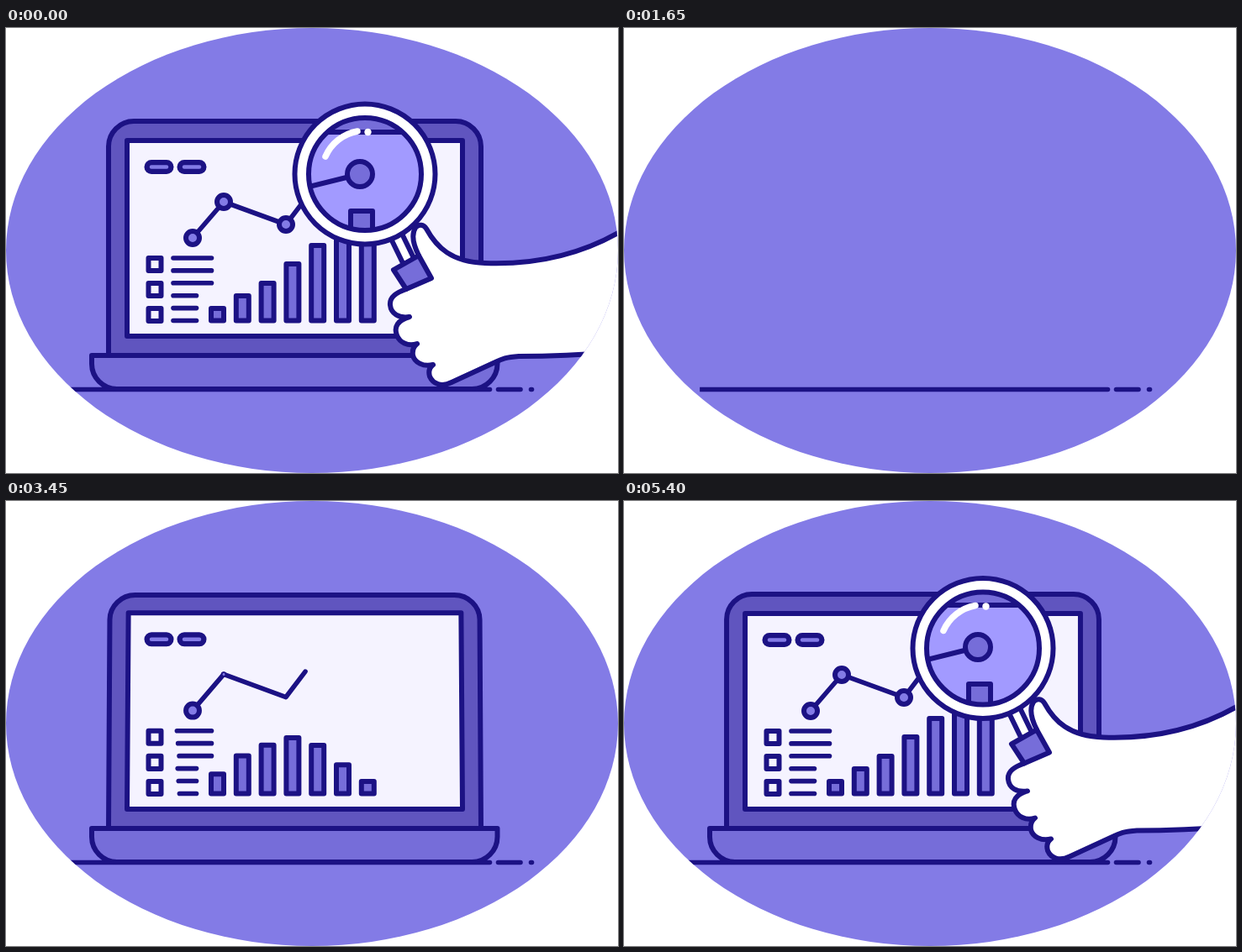
An HTML page with a canvas for the animation above (5.43 s loop, 728 by 530 pixels).

```html
<!DOCTYPE html>
<html>
<head>
<meta charset="utf-8">
<style>
html, body { margin: 0; width: 728px; height: 530px; overflow: hidden; background: #fff; }
canvas { display: block; }
</style>
</head>
<body>
<canvas id="stage" width="728" height="530"></canvas>
<script>
const c = document.getElementById('stage').getContext('2d');
const LOOP = 5430, DARK = '#1c1284', BG = '#837be6', BODY = '#766dd9', LID = '#6055bf', PAPER = '#f5f3ff';
const { sin, cos, exp, PI, max, min, hypot } = Math;
const clamp = v => max(0, min(1, v));
const easeOut = v => 1 - (1 - clamp(v)) ** 2;

// Smooth interpolation through rows of [time, ...values]
function keys(rows, t) {
  if (t <= rows[0][0]) return rows[0].slice(1);
  const last = rows.length - 1;
  if (t >= rows[last][0]) return rows[last].slice(1);
  let i = 0;
  while (t >= rows[i + 1][0]) i++;
  const a = rows[i], b = rows[i + 1], d = b[0] - a[0], u = (t - a[0]) / d;
  const slope = (k, n) => {
    if (k < 1 || k >= last) return 0;
    const p = rows[k - 1], q = rows[k], r = rows[k + 1];
    return (r[n] - q[n]) * (q[n] - p[n]) <= 0 ? 0 : (r[n] - p[n]) / (r[0] - p[0]);
  };
  return a.slice(1).map((v, j) => {
    const n = j + 1, w = b[n];
    return v + (w - v) * u * u * (3 - 2 * u)
      + d * u * (1 - u) * ((1 - u) * slope(i, n) - u * slope(i + 1, n));
  });
}

function shape(path, fill, stroke = DARK, width = 6) {
  c.lineWidth = width;
  if (fill) { c.fillStyle = fill; c.fill(path); }
  if (stroke) { c.strokeStyle = stroke; c.stroke(path); }
}
const svg = (d, ...style) => shape(new Path2D(d), ...style);
function box(x, y, w, h, fill) {
  const p = new Path2D();
  p.rect(x, y, w, h);
  shape(p, fill);
}
function disc(x, y, rx, ry, ...style) {
  const p = new Path2D();
  p.ellipse(x, y, rx, ry, 0, 0, 2 * PI);
  shape(p, ...style);
}

// grip offset x, y, rotation in degrees, vertical stretch
const ENTER = [
  [3600, 400, 20, 18, 1.2], [3750, 260, 0, 16, 1.15], [3930, 120, -21, 13, 1.11],
  [4080, 46, -11, 7, 1.06], [4230, 4, -5, 1, 1.01], [4350, -9, 1, -1, 1],
  [4500, 0, 9, 0, 1], [4800, 0, 22, 0, 1], [5080, 0, 16, 0, 1], [5400, 0, 1.5, 0, 1], [5430, 0, 0, 0, 1]];
const LEAVE = [
  [0, 0, 0, 0, 1], [300, 1, -9, 0, 1], [570, 10, -25, 2, 1.03], [720, 50, -70, 5, 1.1],
  [900, 130, -115, 8, 1.22], [1080, 247, -162, 11, 1.37], [1200, 360, -190, 13, 1.5]];
const SCREEN = [
  [0, 245, 243, 255], [500, 245, 243, 255], [1080, 103, 94, 200],
  [2450, 103, 94, 200], [2730, 170, 163, 255], [3000, 245, 243, 255]];
const POINTS = [[222, 250], [259, 207], [333, 234], [371, 184], [430, 170]];
const LENGTH = POINTS.slice(1).reduce((s, p, i) => s + hypot(p[0] - POINTS[i][0], p[1] - POINTS[i][1]), 0);
const BAR_TOPS = [334, 319, 304, 281, 259, 244, 195];
const bounce = v => keys([[0, 0], [210, 1.6], [420, .92], [600, 1]], v)[0];
const nodeSize = (i, t) => easeOut((t - 3330 - 100 * i) / 130);

function ground(t) {
  const from = t > 1590 && t < 2220 ? 76 + 552 * clamp((t - 1590) / 420) ** 1.9 : 70;
  const to = t >= 2220 ? 76 + 553 * clamp((t - 2220) / 681) ** 1.9 : 640;
  if (t > 2010 && t < 2220) return;
  c.save();
  c.beginPath();
  c.rect(from, 420, max(0, to - from), 20);
  c.clip();
  svg('M60 430.5H575.5M585.5 430.5H612M624.5 430.5H625.5', null, DARK, 5.6);
  c.restore();
}

function pose(t) {
  let angle, h, dy = 0;
  if (t < 2000) {
    angle = 90 * clamp((t - 540) / 675) ** 2.37;
    h = 40 * (1 - clamp((t - 900) / 500) ** 2.25);
  } else {
    angle = t < 2810 ? keys([[2380, 90], [2730, 19], [2810, 0]], t)[0]
      : -15 * sin((t - 2810) / 500 * 2 * PI) * exp((2810 - t) / 600);
    h = keys([[2300, 0], [2560, 40.5], [3128, 40]], t)[0];
    dy = -70 * max(0, 1 - ((t - 2850) / 278) ** 2);
  }
  const a = angle * PI / 180;
  return { angle, h, dy, co: cos(a), si: sin(a), top: 430 - h + dy };
}

function chart(t) {
  for (let i = 0; i < 2; i++) {
    const k = easeOut((t - 2726) / 250), x = 182 + 39 * i, y = 165.5 + 14 * (1 - k);
    if (!k) continue;
    const d = `M${x - 9 * k} ${y}h${18 * k}`;
    svg(d, null, DARK, 17 * k);
    svg(d, null, BG, 4.5 * k);
  }
  for (let i = 0; i < 3; i++) {
    const k = easeOut((t - 2725) / 250), h = 15 * (.3 + .7 * k);
    if (k) box(177 + (2 + 2.5 * i) * (1 - k) - 7.5 * k, 281.5 + 30 * i - h / 2, 15 * k, h, PAPER);
  }
  for (let i = 0; i < 6; i++) {
    const k = easeOut((t - 3120 - 20 * i) / 480), right = i < 3 ? 244.5 : 226.5;
    if (k) svg(`M${right} ${274 + 14.9 * i}H${right - (right - 199) * k}`, null, DARK, 5.6);
  }
  BAR_TOPS.forEach((top, i) => {
    const h = (348.5 - top) * bounce(t - 3240 - 30 * i);
    if (h > .5) box(244 + 29.8 * i, 348.5 - h, 15, h, BODY);
  });
  const drawn = clamp((t - 3270) / 270);
  if (drawn) {
    c.setLineDash([LENGTH * drawn, 999]);
    svg('M' + POINTS.join('L'), null, DARK, 5.6);
    c.setLineDash([]);
  }
  POINTS.forEach(([x, y], i) => {
    const k = nodeSize(i, t);
    if (k) disc(x, y, 8 * k, 8 * k, BG, DARK, 6 * k);
  });
}

function laptop(t, p, chartTime) {
  if (p.h < .5) return;
  const { top, co, si, h } = p;
  if (p.angle < 89) {
    const y = top - 1 - 278 * co, w = 18.5 * si, r = 30 * (.3 + .7 * co) + 8 * si;
    const l = 122 - w, e = 565 + w, s = w * r / 277;
    svg(`M122 ${top}L${l + s} ${y + r}Q${l} ${y} ${l + 30} ${y}H${e - 30}Q${e} ${y} ${e - s} ${y + r}L565 ${top}Z`, LID, null);
    // rounded top corners
    const k = .45 * r;
    svg(`M122 ${top}L${l + s} ${y + r}C${l} ${y + k} ${l + 13.5} ${y} ${l + 30} ${y}H${e - 30}C${e - 13.5} ${y} ${e} ${y + k} ${e - s} ${y + r}L565 ${top}`, LID);
    const scale = max(0, co - .09 * si), bottom = top - 1 - 22 * co, high = bottom - 233 * scale;
    const rgb = keys(SCREEN, t).map(Math.round);
    svg(`M144 ${bottom}L${144 - w} ${high}H${543 + w}L543 ${bottom}Z`, `rgb(${rgb})`);
    c.save();
    c.translate(0, bottom);
    c.scale(1, scale);
    c.translate(0, -367);
    chart(chartTime);
    c.restore();
  }
  const b = top + h, r = 30 * min(1, h / 40) ** 4;
  svg(`M102 ${top}H584.5V${top + h * .25}C584.5 ${top + h * .66} ${584.5 - r * .45} ${b} ${584.5 - r} ${b}H${102 + r}C${102 + r * .45} ${b} 102 ${top + h * .66} 102 ${top + h * .25}Z`, BODY);
}

// enlarged view seen through the glass
function lensView(p, chartTime) {
  c.fillStyle = BG;
  c.fillRect(0, 0, 728, 530);
  c.translate(0, p.top - 278 * p.co - 112);
  svg('M60 600V116Q60 86 90 86H592Q622 86 622 116V600', BODY);
  box(100, 124, 484, 500, '#a29aff');
  const h = 140 * min(1, bounce(chartTime - 3420));
  if (h > 1) box(410, 358 - h, 26, h, BODY);
  const k = nodeSize(4, chartTime);
  if (k) {
    svg('M340 194L421 174');
    disc(421, 174, 15 * k, 15 * k, BODY);
  }
}

function hand(t, p, chartTime) {
  if (t > 1200 && t < 3600) return;
  const [dx, dy, turn, stretch] = keys(t < 2000 ? LEAVE : ENTER, t);
  c.save();
  c.translate(484 + dx, 291 + dy);
  c.scale(1, stretch);
  c.rotate(turn * PI / 180);
  c.translate(-484, -291);

  const outer = max(.75, 1 - .8 * (stretch - 1)), inner = max(.65, 1 - 1.65 * (stretch - 1));
  svg('M457 249L474 284L486 276L470 243Z', '#fff');
  disc(427, 174, 83.5 * outer, 83.5, '#fff');
  c.save();
  c.beginPath();
  c.ellipse(427, 174, 67 * inner, 67, 0, 0, 2 * PI);
  c.clip();
  c.setTransform(1, 0, 0, 1, 0, 0);
  lensView(p, chartTime);
  c.restore();
  disc(427, 174, 67 * inner, 67);
  c.save();
  c.translate(427, 174);
  c.scale(inner, 1);
  svg('M-47 -21A51.5 51.5 0 0 1 -9 -51', null, '#fff', 7.5);
  disc(3.5, -50, 4.2, 4.2, '#fff', null);
  c.restore();

  svg('M491 271C485 259 482 246 487 238C491 233 497 234 500 239C512 261 530 279 570 280C625 282 680 271 728 244L1000 90V400L728 386C690 389 640 391 610 391C595 392 590 394 582 398L530 422C518 428 508 424 504 415C502 408 504 404 508 401C496 404 486 398 484 390C483 383 485 379 489 376C478 380 468 374 465 366C461 356 466 348 480 344C467 346 458 340 457 330C456 320 465 315 476 311', '#fff');
  svg('M461 288L491 271L506 298L476 311Z', BODY);
  c.restore();
}

function draw(t) {
  // the chart folds away by running its build-up backwards
  const chartTime = t < 1200 ? 4120 - 2.2 * max(0, t - 100) : t;
  const p = pose(t);
  c.setTransform(1, 0, 0, 1, 0, 0);
  c.fillStyle = '#fff';
  c.fillRect(0, 0, 728, 530);
  c.lineCap = 'round';
  c.lineJoin = 'miter';
  c.save();
  c.beginPath();
  c.ellipse(364, 265, 364, 265, 0, 0, 2 * PI);
  c.clip();
  c.fillStyle = BG;
  c.fillRect(0, 0, 728, 530);
  ground(t);
  c.lineJoin = 'round';
  laptop(t, p, chartTime);
  hand(t, p, chartTime);
  c.restore();
}

const start = performance.now();
function tick() {
  draw((performance.now() - start) % LOOP);
  requestAnimationFrame(tick);
}
tick();
</script>
</body>
</html>
```
